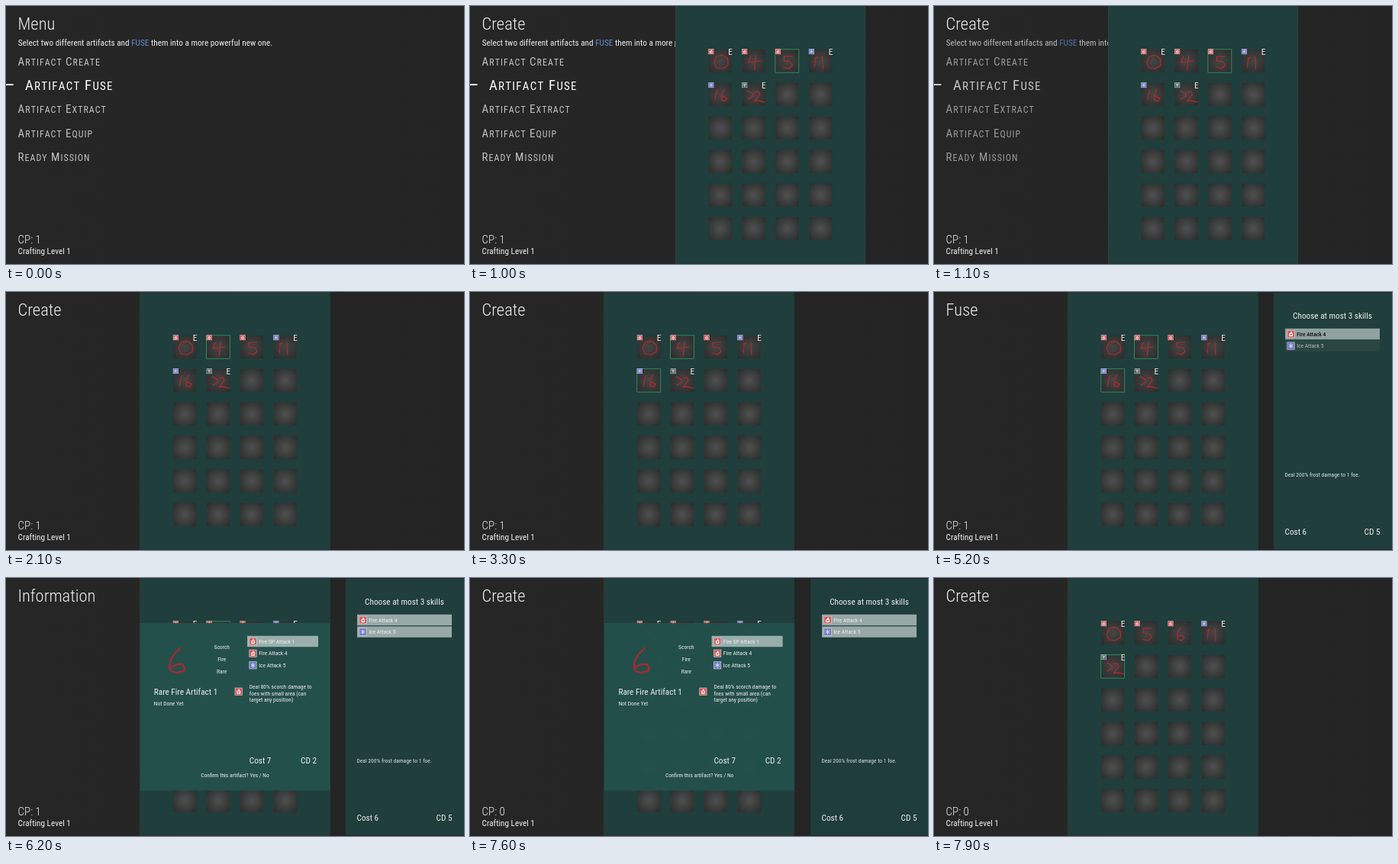
Recreate the animation shown at these times as an HTML page with a canvas. Size 600 by 338 pixels, loop 8500 ms.

```html
<!DOCTYPE html>
<html lang="en">
<head>
<meta charset="utf-8">
<title>Artifact menu</title>
<style>
html, body { margin: 0; width: 100%; height: 100%; overflow: hidden; background: #262627; }
canvas { display: block; }
</style>
</head>
<body>
<canvas id="stage" width="600" height="338"></canvas>
<script>
const ctx = document.getElementById('stage').getContext('2d');
const LOOP = 8500;
const FAMILY = '"Roboto Condensed", Roboto, sans-serif';
const PANEL = '#203e3b', WHITE = '#eeeeee', RED = '#b42a2c';
const ELEMENTS = { fire: '#d65a5c', ice: '#7078c4', wind: '#4c6866' };

// Handwritten marks: strokes of x,y points inside a 30 px cell.
const MARKS = {
  0: ['17,7 10,9 7,17 10,24 18,25 25,21 25,13 20,8 13,8'],
  4: ['11,9 8,17 16,16 24,15', '18,8 17,17 16,27'],
  5: ['22,9 11,9 11,15 19,16 22,21 17,25 10,23'],
  6: ['16,8 12,15 12,23 17,25 21,21 18,18 12,20'],
  11: ['9,10 8,16 7,23', '7,12 11,10', '17,9 18,16 18,25'],
  16: ['11,9 9,16 8,22', '20,8 17,15 17,22 21,24 24,20 18,17'],
  22: ['7,10 14,14 14,17 8,21', '16,12 21,11 23,15 16,24 21,23 29,25']
};
const item = (mark, element, equipped) => ({ mark, element, equipped });
const BEFORE = [item(0, 'fire', true), item(4, 'fire'), item(5, 'fire'),
  item(11, 'ice', true), item(16, 'ice'), item(22, 'wind', true)];
const AFTER = [BEFORE[0], BEFORE[2], item(6, 'fire'), BEFORE[3], BEFORE[5]];

const clamp = v => Math.max(0, Math.min(1, v));
const progress = (t, start, length) => clamp((t - start) / length);
const slideIn = p => 94 * (1 - p) ** 2;

function setFont(size, weight = 400) {
  ctx.font = `${weight} ${size}px ${FAMILY}`;
}

// Narrow plain Roboto uniformly when no condensed face is available.
function condensedScale() {
  const sample = 'Select two different artifacts';
  ctx.font = '100px Roboto, sans-serif';
  const normal = ctx.measureText(sample).width;
  ctx.fontStretch = 'condensed';
  setFont(100);
  return ctx.measureText(sample).width < normal * 0.95 ? 1 : 0.88;
}
const narrow = condensedScale();

// y is the middle of the capital letters; returns the drawn width.
function text(str, x, y, size, { color = WHITE, weight = 400, align = 'left', base = size } = {}) {
  setFont(size, weight);
  ctx.fillStyle = color;
  ctx.textAlign = align;
  ctx.save();
  ctx.translate(x, y + base * 0.355);
  ctx.scale(narrow, 1);
  ctx.fillText(str, 0, 0);
  ctx.restore();
  return ctx.measureText(str).width * narrow;
}

function smallCaps(str, x, y, size, color) {
  for (const ch of str) {
    const scale = /[a-z]/.test(ch) ? 0.8 : 1;
    x += text(ch.toUpperCase(), x, y, size * scale, { color, base: size }) + size * 0.067;
  }
}

function box(x, y, w, h, color) {
  ctx.fillStyle = color;
  ctx.fillRect(x, y, w, h);
}

function line(points, color, width) {
  ctx.strokeStyle = color;
  ctx.lineWidth = width;
  ctx.lineJoin = ctx.lineCap = 'round';
  ctx.beginPath();
  points.split(' ').forEach(p => ctx.lineTo(...p.split(',').map(Number)));
  ctx.stroke();
}

function icon(element, x, y, size) {
  ctx.save();
  ctx.translate(x, y);
  ctx.scale(size / 10, size / 10);
  box(0, 0, 10, 10, '#d8d8dc');
  box(0.6, 0.6, 8.8, 8.8, ELEMENTS[element]);
  if (element === 'fire') {
    line('3.3,4.5 3.2,7.4 6.8,7.4 6.8,4.5 5.4,2.4 5,4.5 3.3,4.5', '#fff', 1.1);
  } else if (element === 'ice') {
    ['5,2 5,8', '2.4,3.5 7.6,6.5', '2.4,6.5 7.6,3.5'].forEach(s => line(s, '#e4e6ff', 0.9));
  } else {
    ['2.5,3 7.5,3', '3.3,5 6.7,5', '5,5 5,8'].forEach(s => line(s, '#e6eeee', 1));
  }
  ctx.restore();
}

function cell(x, y, content, selected) {
  const shade = ctx.createRadialGradient(15, 15, 1, 15, 15, 20);
  shade.addColorStop(0, content ? '#444444' : '#4e4e4e');
  shade.addColorStop(1, '#2b2d2d');
  ctx.save();
  ctx.translate(x, y);
  box(0, 0, 30, 30, shade);
  if (content) {
    MARKS[content.mark].forEach(s => line(s, RED, 1.2));
    if (selected) {
      ctx.strokeStyle = '#2f8a60';
      ctx.lineWidth = 1;
      ctx.strokeRect(-0.25, -0.25, 30.5, 30.5);
    }
    icon(content.element, -0.5, -0.8, 7);
    if (content.equipped) text('E', 31, 3, 11.25, { align: 'right' });
  }
  ctx.restore();
}

function inventory(items, selected) {
  box(175.5, 0.5, 249, 337, '#2a4d49');
  box(176, 1, 248, 336, PANEL);
  for (let i = 0; i < 24; i++) {
    cell(219.3 + 43.85 * (i % 4), 57 + 43.9 * Math.floor(i / 4), items[i], selected.includes(i));
  }
}

// glow: 0 plain, 0.06 focused, 1 chosen.
function skillRow(element, name, x, y, width, glow, color = WHITE, weight = 400) {
  box(x, y - 7.2, width, 14.4, `rgba(210,220,218,${glow * 0.68})`);
  icon(element, x + 2.5, y - 5, 10);
  text(name, x + 15.2, y, 7.5, { color, weight });
}

function skillPanel(t) {
  const iceFocused = t >= 5200;
  const chosen = t >= 5300;
  box(445, 1, 156, 336, PANEL);
  text('Choose at most 3 skills', 522, 31.5, 11.25, { align: 'center' });
  if (iceFocused && !chosen) skillRow('fire', 'Fire Attack 4', 460, 55, 124, 0.92, '#101414', 500);
  else skillRow('fire', 'Fire Attack 4', 460, 55, 124, chosen ? 1 : 0.08);
  const ice = iceFocused ? 0.08 + 0.92 * progress(t, 5200, 300) : 0;
  skillRow('ice', 'Ice Attack 5', 460, 70.6, 124, ice, chosen ? WHITE : '#b4bcba');
  text(`Deal 200% ${iceFocused ? 'frost' : 'fire'} damage to 1 foe.`, 459.5, 239.3, 7.5, { color: '#dde2e1' });
  text(`Cost ${iceFocused ? 6 : 5}`, 459.5, 314.5, 11.25);
  text(`CD ${iceFocused ? 5 : 4}`, 584.5, 314.5, 11.25, { align: 'right' });
}

function resultDialog() {
  box(175.5, 59, 249, 219.5, '#24504c');
  line('228,92 221,99 216,107 214,116 216,122 223,124 233,122 234,117 231,113 224,113 216,117', '#aa2a30', 2.3);
  ['Scorch', 'Fire', 'Rare'].forEach((tag, i) =>
    text(tag, 282.7, 90.8 + 15.7 * i, 7.5, { align: 'center' }));
  skillRow('fire', 'Fire SP Attack 1', 316, 83, 93, 1);
  skillRow('fire', 'Fire Attack 4', 316, 98.7, 93, 0);
  skillRow('ice', 'Ice Attack 5', 316, 114.3, 93, 0);
  text('Rare Fire Artifact 1', 193.8, 148.8, 11.25);
  text('Not Done Yet', 193.8, 164, 7.5);
  icon('fire', 299.7, 143.7, 10);
  ['Deal 80% scorch damage to', 'foes with small area (can', 'target any position)'].forEach((s, i) =>
    text(s, 318.8, 142 + 8.9 * i, 7.5));
  text('Cost 7', 318.8, 239.5, 11.25);
  text('CD 2', 407, 239.5, 11.25, { align: 'right' });
  text('Confirm this artifact? Yes / No', 300, 258.3, 7.5, { align: 'center' });
}

function menu() {
  let x = 15.7;
  for (const [part, color] of [['Select two different artifacts and ', WHITE], ['FUSE', '#5f8fd0'],
    [' them into a more powerful new one.', WHITE]]) {
    x += text(part, x, 47.6, 11.25, { color });
  }
  ['Artifact Create', 'Artifact Fuse', 'Artifact Extract', 'Artifact Equip', 'Ready Mission'].forEach((label, i) => {
    const y = 72.5 + 31.3 * i;
    if (i === 1) smallCaps(label, 25, y, 18.75, '#ffffff');
    else smallCaps(label, 15.6, y, 15, '#c2c2c2');
  });
  box(0, 102, 9.5, 2, '#ffffff');
}

function selection(t) {
  if (t < 2100) return [2];
  if (t < 2900) return [1];
  if (t < 3200) return [1, 5];
  return t < 7600 ? [1, 4] : [4];
}

function title(t) {
  if (t < 1000) return 'Menu';
  if (t < 3700 || t >= 7600) return 'Create';
  return t < 5600 ? 'Fuse' : 'Information';
}

function layer(shift, alpha, paint) {
  if (alpha <= 0) return;
  ctx.save();
  ctx.globalAlpha = alpha;
  ctx.translate(shift, 0);
  paint();
  ctx.restore();
}

const backdrop = ctx.createLinearGradient(0, 0, 600, 0);
backdrop.addColorStop(0, '#272627');
backdrop.addColorStop(1, '#242425');

function draw(t) {
  box(0, 0, 600, 338, backdrop);
  const done = t >= 7600;
  const closing = progress(t, 7600, 300);
  const out = 1 - (1 - closing) ** 2;

  layer(0, 1 - progress(t, 1000, 400), menu);
  text(title(t), 15.5, 23, 22.5, { weight: 300 });
  text(`CP: ${done ? 0 : 1}`, 15.6, 305.5, 15, { weight: 300 });
  text('Crafting Level 1', 15.6, 321, 11.25);

  if (t >= 1000) {
    layer(slideIn(progress(t, 1000, 400)), 1, () => inventory(done ? AFTER : BEFORE, selection(t)));
  }
  if (t >= 3700) {
    layer(slideIn(progress(t, 3700, 400)) + 156 * out, 1 - closing, () => skillPanel(t));
  }
  if (t >= 5600) {
    layer(slideIn(progress(t, 5600, 400)) + 94 * out, 1 - out, resultDialog);
  }
}

function tick() {
  draw(performance.now() % LOOP);
  requestAnimationFrame(tick);
}
tick();
</script>
</body>
</html>
```
